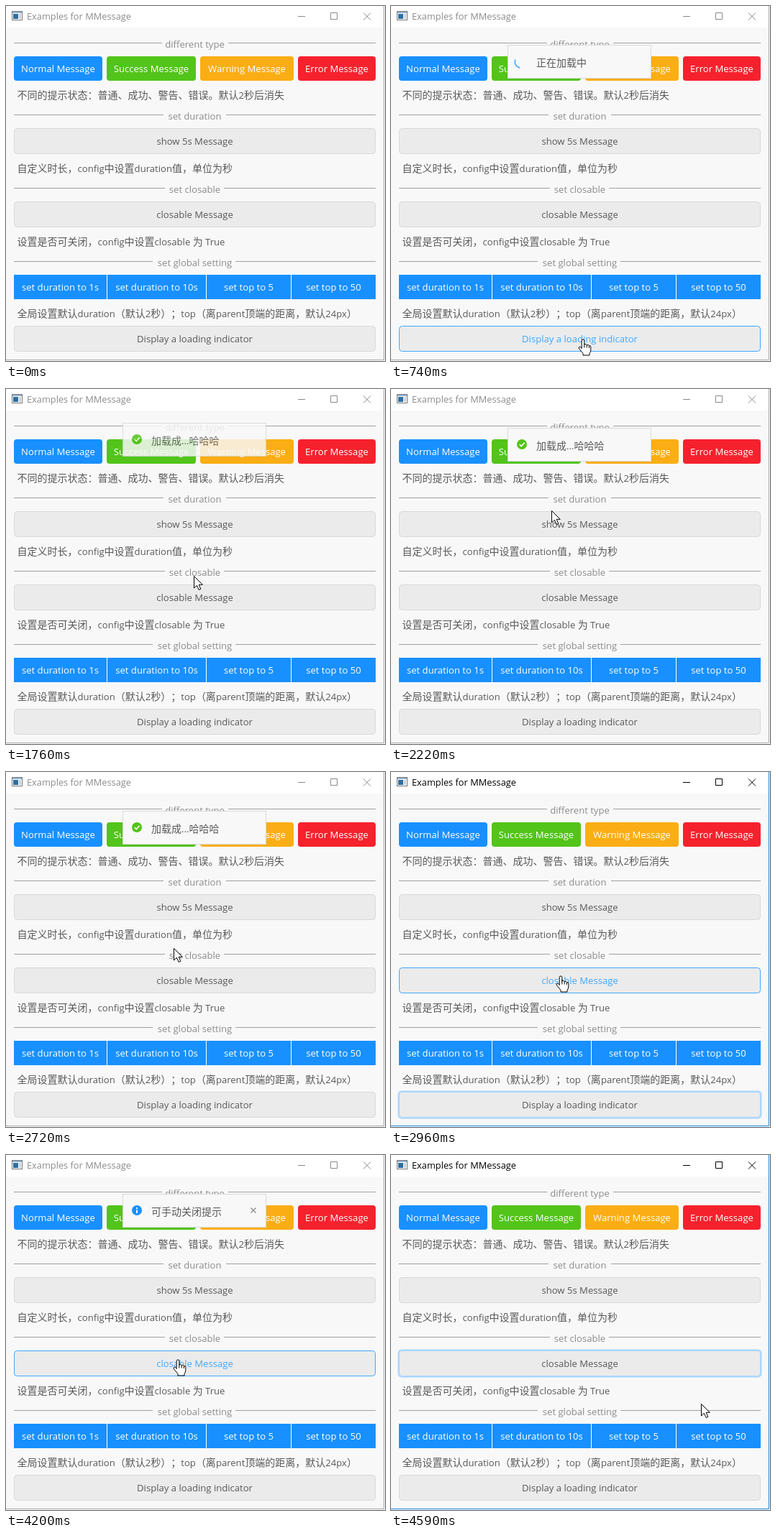
Write an HTML page that moves like this. It is 527x494 px and loops after 4.62 s.

```html
<!DOCTYPE html>
<html lang="zh-CN">
<head>
<meta charset="utf-8">
<title>Message examples</title>
<style>
html, body { margin: 0; width: 100%; height: 100%; overflow: hidden; background: #fff; }
svg { display: block; }
text { font: 13.1px "Open Sans", "Noto Sans", sans-serif; fill: #595959; white-space: pre; text-spacing-trim: space-all; }
.cjk { font: 14px "Noto Sans CJK SC", "Noto Sans CJK", sans-serif; }
.mid { text-anchor: middle; }
</style>
</head>
<body>
<svg id="stage" width="527" height="494" viewBox="0 0 527 494"></svg>
<script>
const LOOP = 4620;
const SLIDE = 180;
const BLUE = '#1890ff', LIGHT_BLUE = '#40a9ff', GREEN = '#52c41a';
const stage = document.getElementById('stage');

function add(parent, tag, attrs = {}, content = '') {
  const el = document.createElementNS('http://www.w3.org/2000/svg', tag);
  set(el, attrs);
  el.textContent = content;
  parent.append(el);
  return el;
}

function set(el, attrs) {
  for (const key in attrs) el.setAttribute(key, attrs[key]);
}

const show = (el, on) => set(el, { visibility: on ? 'visible' : 'hidden' });

// Latin and Chinese runs use different fonts and sizes.
function label(parent, x, y, content, attrs = {}) {
  const el = add(parent, 'text', { x, y, ...attrs });
  for (const run of content.match(/[\x00-\x7f]+|[^\x00-\x7f]+/g)) {
    add(el, 'tspan', run.charCodeAt(0) > 127 ? { class: 'cjk' } : {}, run);
  }
  return el;
}

function rect(parent, x, y, width, height, fill, attrs = {}) {
  return add(parent, 'rect', { x, y, width, height, fill, ...attrs });
}

const line = (parent, d, stroke, attrs = {}) =>
  add(parent, 'path', { d, stroke, fill: 'none', ...attrs });

// Window
rect(stage, 0, 0, 527, 494, '#fff');
rect(stage, 0, 30, 525, 462, '#f8f8f8');
const frame = line(stage, 'M525.5 0V492.5H0', '#a8a8a8');
rect(stage, 8.5, 7.5, 14, 12, '#fff', { stroke: '#777' });
rect(stage, 9, 8, 13, 2, '#8fb4d6');
rect(stage, 10, 11, 7, 7, '#2f6f9f');
rect(stage, 18, 11, 3, 7, '#c9d3da');
const title = label(stage, 29, 19, 'Examples for MMessage', { style: 'font-size:12.8px' });
const controls = line(stage, 'M406 14.5H416M451.5 9.5H460.5V18.5H451.5ZM497 9.5L507 19.5M507 9.5L497 19.5', '#888');

// Dividers and descriptions
const sections = [
  [51, 'different type', 217, 309, 129, '不同的提示状态：普通、成功、警告、错误。默认2秒后消失'],
  [151, 'set duration', 219, 306, 231, '自定义时长，config中设置duration值，单位为秒'],
  [253, 'set closable', 221, 303, 333, '设置是否可关闭，config中设置closable 为 True'],
  [355, 'set global setting', 204, 319, 433, '全局设置默认duration（默认2秒）；top（离parent顶端的距离，默认24px）']
];
for (const [y, heading, left, right, noteY, note] of sections) {
  line(stage, `M11 ${y + .5}H${left}M${right} ${y + .5}H514`, '#a0a0a0');
  label(stage, 262.5, y + 7, heading, { class: 'mid', style: 'fill:#8c8c8c' });
  label(stage, 15.5, noteY, note);
}

// Buttons
const buttons = [];

function solidButton(x, y, right, content, color, rx, hoverColor = color) {
  const box = rect(stage, x, y, right - x, 34, color, { rx });
  label(stage, (x + right) / 2, y + 22, content, { class: 'mid', style: 'fill:#fff' });
  buttons.push({ x, y, right, bottom: y + 34, paint: hover => set(box, { fill: hover ? hoverColor : color }) });
}

function plainButton(y, content) {
  const glow = rect(stage, 10.5, y - .5, 504, 37, 'none', { rx: 4, stroke: '#a9d6ff', 'stroke-width': 2 });
  const box = rect(stage, 11.5, y + .5, 502, 35, '#ebebeb', { rx: 4 });
  const text = label(stage, 262.5, y + 23, content, { class: 'mid' });
  const button = {
    x: 11, y, right: 514, bottom: y + 36,
    paint(hover, focused) {
      show(glow, focused);
      set(box, { stroke: hover ? LIGHT_BLUE : focused ? '#a9d6ff' : '#d9d9d9' });
      text.style.fill = hover ? LIGHT_BLUE : '#595959';
    }
  };
  buttons.push(button);
  return button;
}

solidButton(11, 70, 134, 'Normal Message', BLUE, 4);
solidButton(140, 70, 264, 'Success Message', GREEN, 4);
solidButton(270, 70, 400, 'Warning Message', '#faad14', 4);
solidButton(406, 70, 514, 'Error Message', '#f5222d', 4);
plainButton(170, 'show 5s Message');
const closableButton = plainButton(272, 'closable Message');
rect(stage, 11, 374, 503, 34, '#fff');
solidButton(11, 374, 140, 'set duration to 1s', BLUE, 0, LIGHT_BLUE);
solidButton(141, 374, 278, 'set duration to 10s', BLUE, 0, LIGHT_BLUE);
solidButton(279, 374, 396, 'set top to 5', BLUE, 0, LIGHT_BLUE);
solidButton(397, 374, 514, 'set top to 50', BLUE, 0, LIGHT_BLUE);
const loadingButton = plainButton(445, 'Display a loading indicator');

// Toasts, each visible from start to end
function toast(start, end, content) {
  const el = add(stage, 'g');
  rect(el, 162.5, 54.5, 199, 46, '#f8f8f8', { stroke: '#d9d9d9' });
  label(el, 202, 84, content);
  return { el, start, end };
}

const loading = toast(380, 1680, '正在加载中');
const success = toast(1680, 2880, '加载成...哈哈哈');
const closable = toast(3190, 4400, '可手动关闭提示');
const toasts = [loading, success, closable];

const spinner = line(loading.el, 'M174.3 71.9A8.7 8.7 0 0 1 187.7 71.9', LIGHT_BLUE, { 'stroke-width': 1.5 });
add(success.el, 'circle', { cx: 182, cy: 77, r: 7, fill: GREEN });
line(success.el, 'M178.6 77L181.2 79.6L185.6 74.8', '#fff', { 'stroke-width': 1.6 });
add(closable.el, 'circle', { cx: 182, cy: 77, r: 7, fill: BLUE });
line(closable.el, 'M182 73V75M182 76.2V81', '#fff', { 'stroke-width': 1.8 });
line(closable.el, 'M340.5 73.5L347.5 80.5M347.5 73.5L340.5 80.5', '#8c8c8c', { 'stroke-width': 1.4 });

// Cursors, with the hot spot at the origin
const ink = { fill: '#fff', 'stroke-linejoin': 'round' };
const arrow = line(stage, 'M.5 1.5V18L4.4 14.3L7.2 20.5L9.8 19.4L7.2 13.3H12.3Z', '#000', ink);
const hand = add(stage, 'g');
line(hand, 'M-1.8 13.5V2.5Q-1.8 1 0 1T1.8 2.5V8Q4.4 6.5 5.2 8.8Q7.6 7.5 8.3 9.7Q10.8 8.9 10.8 11.5V15.5Q10.8 18.5 9 20.5V23H0V20.5L-5.3 14Q-6.6 11.8-4.8 11Q-3.6 10.7-1.8 13.5Z', '#000', ink);
line(hand, 'M1.8 7.5V12.5M5.2 9V12.5M8.3 10V13', '#000');

const cursorPath = [
  [60, 330, 500], [200, 290, 475], [300, 267, 463], [1090, 267, 463],
  [1300, 275, 440], [1490, 298, 400], [1610, 285, 296], [1800, 255, 250],
  [2160, 222, 152], [2220, 223, 168], [2450, 228, 205], [2690, 232, 238],
  [2930, 236, 283], [3130, 236, 283], [3200, 239, 284], [4200, 239, 284],
  [4400, 320, 310], [4590, 431, 345]
];

function cursorAt(t) {
  const next = cursorPath.findIndex(point => point[0] > t);
  if (next < 0) return cursorPath[cursorPath.length - 1].slice(1);
  const [t0, x0, y0] = cursorPath[Math.max(next - 1, 0)];
  const [t1, x1, y1] = cursorPath[next];
  const k = t1 > t0 ? (t - t0) / (t1 - t0) : 0;
  return [Math.round(x0 + (x1 - x0) * k), Math.round(y0 + (y1 - y0) * k)];
}

function placeToast({ el, start, end }, t) {
  const k = Math.max(0, Math.min(1, (t - start) / SLIDE, (end - t) / SLIDE));
  const eased = 1 - (1 - k) ** 3;
  set(el, { opacity: eased, transform: `translate(0 ${Math.round(40 * (eased - 1))})` });
}

function render(t) {
  const active = t >= 350 && !toasts.some(({ start, end }) => t >= start && t < end);
  title.style.fill = active ? '#000' : '#8c8c8c';
  set(controls, { stroke: active ? '#000' : '#888' });
  set(frame, { stroke: active ? '#1883d7' : '#a8a8a8' });

  const [x, y] = cursorAt(t);
  const focus = t < 3160 ? loadingButton : closableButton;
  let over = false;
  for (const button of buttons) {
    const hover = t >= 60 && x >= button.x && x < button.right && y >= button.y && y < button.bottom;
    button.paint(hover, active && button === focus);
    over = over || hover;
  }
  show(arrow, t >= 60 && !over);
  show(hand, over);
  for (const el of [arrow, hand]) set(el, { transform: `translate(${x} ${y})` });

  for (const item of toasts) placeToast(item, t);
  set(spinner, { transform: `rotate(${240 + (t - 740) * .567} 181 77.5)` });
}

function tick() {
  render(performance.now() % LOOP);
  requestAnimationFrame(tick);
}
tick();
</script>
</body>
</html>
```
